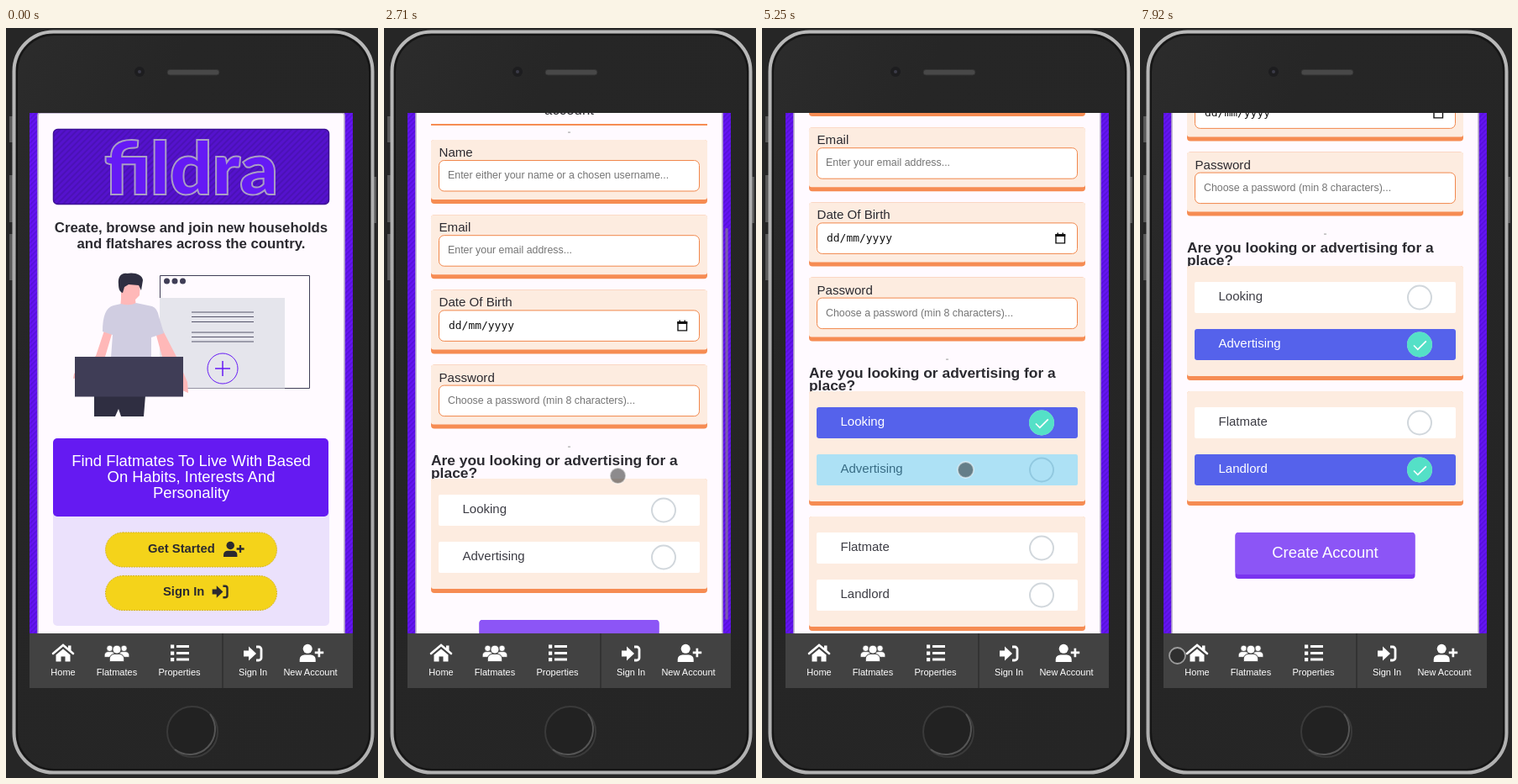
Recreate the animation shown at these times as an HTML page. Size 443 by 892 pixels, loop 8000 ms.

```html
<!DOCTYPE html>
<html lang="en">
<head>
<meta charset="utf-8">
<title>Flatshare sign up</title>
<style>
html, body { margin: 0; width: 100%; height: 100%; overflow: hidden; background: #262626; }
svg { display: block; width: 443px; height: 892px; }
text { font-family: 'Liberation Sans', Arial, sans-serif; fill: #2b2a30; white-space: pre; }
.mid { text-anchor: middle; }
.bold { font-weight: bold; }
.white { fill: #fff; }
.hint { font-size: 12.4px; fill: #757575; }
.label { font-size: 15.1px; }
.logo { font: 900 88px Lato, sans-serif; text-anchor: middle; fill: #651af5; stroke: #aa9fc4; stroke-width: 2; }
</style>
</head>
<body>
<svg viewBox="0 0 443 892">
  <defs>
    <linearGradient id="body" x2="1" y2="1">
      <stop stop-color="#2c2c2c"/><stop offset=".25" stop-color="#262626"/><stop offset="1" stop-color="#252525"/>
    </linearGradient>
    <linearGradient id="rim" x2="0" y2="1">
      <stop stop-color="#b9b9b9"/><stop offset=".5" stop-color="#a4a4a4"/><stop offset="1" stop-color="#b2b2b2"/>
    </linearGradient>
    <pattern id="stripes" width="4" height="4" patternUnits="userSpaceOnUse" patternTransform="rotate(45)">
      <rect width="4" height="4" fill="#6515f3"/><rect width="1.6" height="4" fill="#5510d8"/>
    </pattern>
    <pattern id="dark" width="5" height="5" patternUnits="userSpaceOnUse" patternTransform="rotate(45)">
      <rect width="5" height="5" fill="#5512cd"/><rect width="2" height="5" fill="#4b11b6"/>
    </pattern>
    <clipPath id="screen"><path d="M28 101h385v684H28z"/></clipPath>
    <g id="enter">
      <path d="M-11-3.5h6v-5L4 0l-9 8.5v-5h-6z"/>
      <path d="M4-8h3a3 3 0 0 1 3 3V5a3 3 0 0 1-3 3H4" fill="none" stroke="currentColor" stroke-width="2.8"/>
    </g>
    <g id="join">
      <circle cx="-4" cy="-5.5" r="5.8"/>
      <path d="M-14 11V8a6 6 0 0 1 6-6h8a6 6 0 0 1 6 6v3zM9-6h2.8v4H16v2.8h-4.200V5H9V.8H5V-2h4z"/>
    </g>
  </defs>

  <rect width="443" height="892" fill="#262626"/>
  <g fill="#5a5a5a">
    <path d="M4 105h4v31H4zM4 175h4v56H4zM4 245h4v55H4zM437 177h4v55h-4z"/>
  </g>
  <rect x="9.500" y="4.500" width="427" height="881" rx="47" fill="url(#body)" stroke="url(#rim)" stroke-width="4"/>
  <rect x="13" y="8" width="420" height="874" rx="44" fill="none" stroke="#151515" stroke-width="2"/>
  <circle cx="159" cy="52" r="6" fill="#1d1d1f"/><circle cx="159" cy="52" r="2" fill="#3b3b48"/>
  <rect x="192" y="49.500" width="62" height="6.500" rx="3.200" fill="#484848" stroke="#333"/>
  <circle cx="222" cy="837" r="30" fill="#222" stroke="#3a3a3a" stroke-width="2"/>
  <path d="M201 858a30 30 0 0 0 42-42" fill="none" stroke="#555" stroke-width="2"/>

  <g clip-path="url(#screen)">
    <rect x="28" y="101" width="385" height="684" fill="url(#stripes)"/>
    <g id="home"></g>
    <g id="form"></g>
    <g id="nav"></g>
    <rect id="bar" x="406.500" width="3.200" rx="1.600" fill="#8a8a8a" fill-opacity=".6"/>
  </g>
  <circle id="dot" r="9.500" fill="rgba(28,28,28,.5)" stroke="rgba(255,255,255,.5)" stroke-width="1.800"/>
</svg>
<script>
const $ = id => document.getElementById(id);
const text = (x, y, size, s, cls = '') => `<text x="${x}" y="${y}" font-size="${size}" class="${cls}">${s}</text>`;
const box = (x, y, w, h, fill, r = 0, more = '') =>
  `<rect x="${x}" y="${y}" width="${w}" height="${h}" fill="${fill}" rx="${r}" ${more}/>`;
const icon = (id, x, y, scale, color) =>
  `<use href="#${id}" transform="translate(${x} ${y}) scale(${scale})" fill="${color}" color="${color}"/>`;
const card = y => box(38, y, 365, 1400, '#fffaff', 3, 'stroke="#b9adca" stroke-width="1.6"');
const banner = (y, h, base) =>
  box(56.5, y + .5, 328, h - 1, 'url(#dark)', 5, 'stroke="#3f1296" stroke-width="1.5"') +
  `<text x="220.5" y="${base}" class="logo">fildra</text>`;

// Landing page
const rules = [338, 343.5, 349.5, 362, 367.5, 373].map(y => `M221 ${y}h74`).join('');
const avatar = x => `<circle cx="${x}" cy="415" r="15" fill="#651af5" stroke="#2f2e41"/>
  <g fill="#fff"><circle cx="${x}" cy="411" r="4.2"/><path d="M${x - 6} 430l2-10q4-5 8 0l2 10z"/></g>`;
const art = `
  <path d="M183.500 294.500h178v134h-178z" fill="none" stroke="#3f3d56"/>
  <path d="M183 321h149v107.500H183z" fill="#e5e5ec"/>
  <g fill="#3f3d56"><circle cx="191.500" cy="301" r="3.500"/><circle cx="201" cy="301" r="3.500"/><circle cx="210.500" cy="301" r="3.500"/></g>
  <path d="${rules}" stroke="#55546a"/>
  <circle cx="258" cy="405" r="18" fill="none" stroke="#651af5"/>
  <path d="M249 405h18M258 396v18" stroke="#651af5" stroke-width="1.500"/>
  <path d="M117 360l9 4-8 27-33 25-5 1 1-6 26-21zM178 362l9-2 16 31 13 30 1 13-7-3-2-12-22-28z" fill="#ffb8b8"/>
  <path d="M137 302l23 1-1 15-5 5 1 9-19 2 1-12z" fill="#ffb8b8"/>
  <path d="M134 305c-1-9 3-14 10-13 8-2 19 1 19 8l-2 12-3-6-12-1-5 3-2 7c-4-1-5-6-5-10z" fill="#2f2e41"/>
  <path d="M137 328q10 3 18-1l19 4q6 2 8 12l6 20-15 5v24h-48l2-27-12-4c0-18 4-29 13-31z" fill="#d0cde1"/>
  <path d="M105 437h61l-2 25h-27l-3-9-4 9h-25z" fill="#2f2e41"/>
  <path d="M82 391h129v47.500H82z" fill="#3f3d56"/>`;
const pill = y => box(118.5, y, 204, 41, '#f4d31a', 20.5, 'stroke="#d6b622" stroke-dasharray="2 1"');
$('home').innerHTML = card(101) + banner(120, 90, 198) +
  text(220.5, 243, 16.8, 'Create, browse and join new households', 'mid bold') +
  text(220.5, 262, 16.8, 'and flatshares across the country.', 'mid bold') + art +
  box(56, 570, 329, 141, '#ebe1fc', 5) + box(56, 488, 328, 93, '#651af2', 5) +
  ['Find Flatmates To Live With Based', 'On Habits, Interests And', 'Personality']
    .map((s, i) => text(220.5, 521 + 19 * i, 18.45, s, 'mid white')).join('') +
  pill(600) + pill(651.5) +
  text(169, 624, 14.8, 'Get Started', 'bold') + icon('join', 270.5, 620, .82, '#2b2a30') +
  text(187, 675, 14.8, 'Sign In', 'bold') + icon('enter', 255, 670.5, .85, '#2b2a30');

// Sign up page
const panel = (y, h) => box(56, y, 329, h, '#f68c53', 4) + box(56, y, 329, h - 5, '#fdece0', 3);
const field = (y, label, hint) => panel(y, 76) + text(65.5, y + 20, '', label, 'label') +
  box(65.5, y + 24.5, 310, 36.5, '#fff', 6, 'stroke="#f1874b"') +
  (hint ? text(76, y + 46, '', hint, 'hint') :
    `<text x="77" y="${y + 47}" style="font:12.96px 'DejaVu Sans Mono',monospace;fill:#111">dd/mm/yyyy</text>
     <path d="M350 ${y + 38.500}h10.500v10H350z" fill="none" stroke="#111" stroke-width="1.400"/>
     <path d="M349.300 ${y + 37.500}h12v3h-12zM351.500 ${y + 36}h1.500v2h-1.500zM357.500 ${y + 36}h1.500v2h-1.500z" fill="#111"/>`);
const option = (id, y, label) => `
  <clipPath id="${id}Clip">${box(65, y, 311, 37, '#000', 3)}</clipPath>
  ${box(65, y, 311, 37, '#fff', 2)}
  <circle id="${id}Fill" cx="220.500" cy="${y + 18.5}" fill="#5562eb" clip-path="url(#${id}Clip)"/>
  <text id="${id}Text" x="93.500" y="${y + 22}" font-size="15">${label}</text>
  <circle cx="333" cy="${y + 18.500}" r="14" fill="none" stroke="#d1d7dc" stroke-width="2"/>
  <g id="${id}Tick"><circle cx="333" cy="${y + 18.500}" r="15" fill="#54e0c7"/>
  <path d="M326 ${y + 19.500}l4.800 4.800 10-10" fill="none" stroke="#fff" stroke-width="1.700"/></g>
  ${box(65, y, 311, 37, '#33b5e5', 2, `id="${id}Tap" opacity="0"`)}`;
const dash = y => box(219, y, 3, 1.2, '#aaa');
$('form').innerHTML = card(111) + banner(129, 91, 207) +
  text(220.5, 257, 33.6, 'Sign Up', 'mid bold') +
  text(220.5, 285, 16.8, 'Please complete this form to create a Fildra', 'mid') +
  text(220.5, 300, 16.8, 'account', 'mid') +
  box(56, 311, 329, 2, '#f68c53') + dash(320.5) +
  field(330, 'Name', 'Enter either your name or a chosen username...') +
  field(419.2, 'Email', 'Enter your email address...') +
  field(508.4, 'Date Of Birth') +
  field(597.6, 'Password', 'Choose a password (min 8 characters)...') +
  dash(694.5) +
  text(56, 717, 17.4, 'Are you looking or advertising for a', 'bold') +
  text(56, 732, 17.4, 'place?', 'bold') +
  panel(733, 136) + option('look', 752, 'Looking') + option('adv', 808, 'Advertising') +
  `<g id="extra">${panel(882, 136)}${option('mate', 901, 'Flatmate')}${option('lord', 957, 'Landlord')}</g>
  <g id="create">${box(113.5, 901, 214, 55, '#7a33f0', 4)}${box(113.5, 901, 214, 50, '#8c55f6', 4)}
  ${text(220.5, 931, 18.5, 'Create Account', 'mid white')}</g>`;

// Bottom navigation
const person = (x, y, s) => `<g transform="translate(${x} ${y}) scale(${s})" stroke="#424242" stroke-width="1">
  <circle cy="-4.500" r="5.200"/><path d="M-9 10.500V7a6 6 0 0 1 6-6h6a6 6 0 0 1 6 6v3.500z"/></g>`;
const list = [735.5, 743.5, 751].map(y => `M196 ${y - 2}h4.200v4.200H196zM203 ${y - 1.500}h15v3h-15z`).join('');
$('nav').innerHTML = box(28, 720, 385, 65, '#424242') + box(257, 720, 2, 65, '#333') +
  `<g fill="#fff">
  <path d="M56 744l12-10 12 10" fill="none" stroke="#fff" stroke-width="2.600" stroke-linecap="round"/>
  <path d="M74 734.500h3.500v6H74zM59.500 745.500l8.500-7 8.500 7v8h-6v-6h-5v6h-6z"/>
  ${person(123.5, 741, .7)}${person(140.5, 741, .7)}${person(132, 743.5, .97)}<path d="${list}"/></g>` +
  icon('enter', 294, 744, 1, '#fff') + icon('join', 363, 743.5, .95, '#fff') +
  [[68, 'Home'], [132, 'Flatmates'], [206.5, 'Properties'], [294, 'Sign In'], [362.5, 'New Account']]
    .map(([x, s]) => text(x, 770, 11, s, 'mid white')).join('');

// Each key is [time, ...values]; repeated times make a jump
const pointer = [[290, 417, 650], [620, 303, 624], [800, 305, 626], [1000, 310, 640], [1540, 310, 640],
  [1540, 320.5, 543], [2080, 320.5, 543], [2710, 278.5, 532.5], [3040, 278.5, 532.5], [3670, 252.5, 506.5],
  [3830, 252, 500], [3880, 252, 500], [4080, 250, 470], [4300, 250, 470], [4540, 321.5, 671.5], [4710, 321.5, 671.5],
  [4920, 242.5, 525.5], [5400, 242.5, 525.5], [5720, 285, 771], [6040, 298.5, 677.5], [6080, 298.5, 677.5],
  [6880, 235, 560], [6920, 201.5, 525], [7290, 201.5, 525], [7290, 253, 685], [7670, 253, 685], [7920, 44.5, 746.5]];
const scrolling = [[2080, 0], [2710, 197], [3040, 197], [3640, 301], [6040, 301], [6080, 302], [6840, 450]];
const barFade = [[2100, 0], [2100, 1], [3880, 1], [4080, 0], [6060, 0], [6060, 1], [6900, 1], [6920, .4], [7290, .4], [7290, 0]];

const clamp = v => Math.min(1, Math.max(0, v));
const ease = u => u * u * (3 - 2 * u);
function track(keys, t) {
  const i = keys.findIndex(k => k[0] > t);
  if (i < 0) return keys.at(-1).slice(1);
  if (!i) return keys[0].slice(1);
  const a = keys[i - 1], b = keys[i], u = ease((t - a[0]) / (b[0] - a[0]));
  return a.slice(1).map((v, n) => v + (b[n + 1] - v) * u);
}
const set = (id, attrs) => { for (const k in attrs) $(id).setAttribute(k, attrs[k]); };

function choose(id, k) {
  const mix = (a, b) => Math.round(a + (b - a) * k);
  set(id + 'Fill', { r: 5 + 165 * k, opacity: k });
  set(id + 'Text', { style: `fill:rgb(${mix(60, 255)},${mix(60, 255)},${mix(68, 255)})` });
  set(id + 'Tick', { opacity: k });
}

function draw(now) {
  const t = now % 8000, since = at => ease(clamp((t - at) / 300));
  const signUp = t >= 830, extra = t >= 4240;
  set('home', { display: signUp ? 'none' : 'inline' });
  set('form', { display: signUp ? 'inline' : 'none' });

  const [scroll] = track(scrolling, t);
  set('form', { transform: `translate(0 ${-Math.round(scroll)})` });
  set('extra', { display: extra ? 'inline' : 'none' });
  set('create', { transform: `translate(0 ${extra ? 149 : 0})` });
  choose('look', since(4200) - since(5350));
  choose('adv', since(5350));
  choose('mate', 0);
  choose('lord', t >= 7290 ? 1 : 0);
  set('lookTap', { opacity: t >= 4100 && t < 4200 ? .4 : 0 });
  set('advTap', { opacity: t >= 5250 && t < 5350 ? .4 : 0 });

  const page = extra ? 1134 : 985;
  set('bar', { y: 101 + scroll * 684 / page, height: 684 * 684 / page - 9, opacity: track(barFade, t)[0] });

  const [cx, cy] = track(pointer, t);
  set('dot', { cx, cy, display: t < 290 ? 'none' : 'inline' });
}
function loop() {
  draw(performance.now());
  requestAnimationFrame(loop);
}
loop();
</script>
</body>
</html>
```
